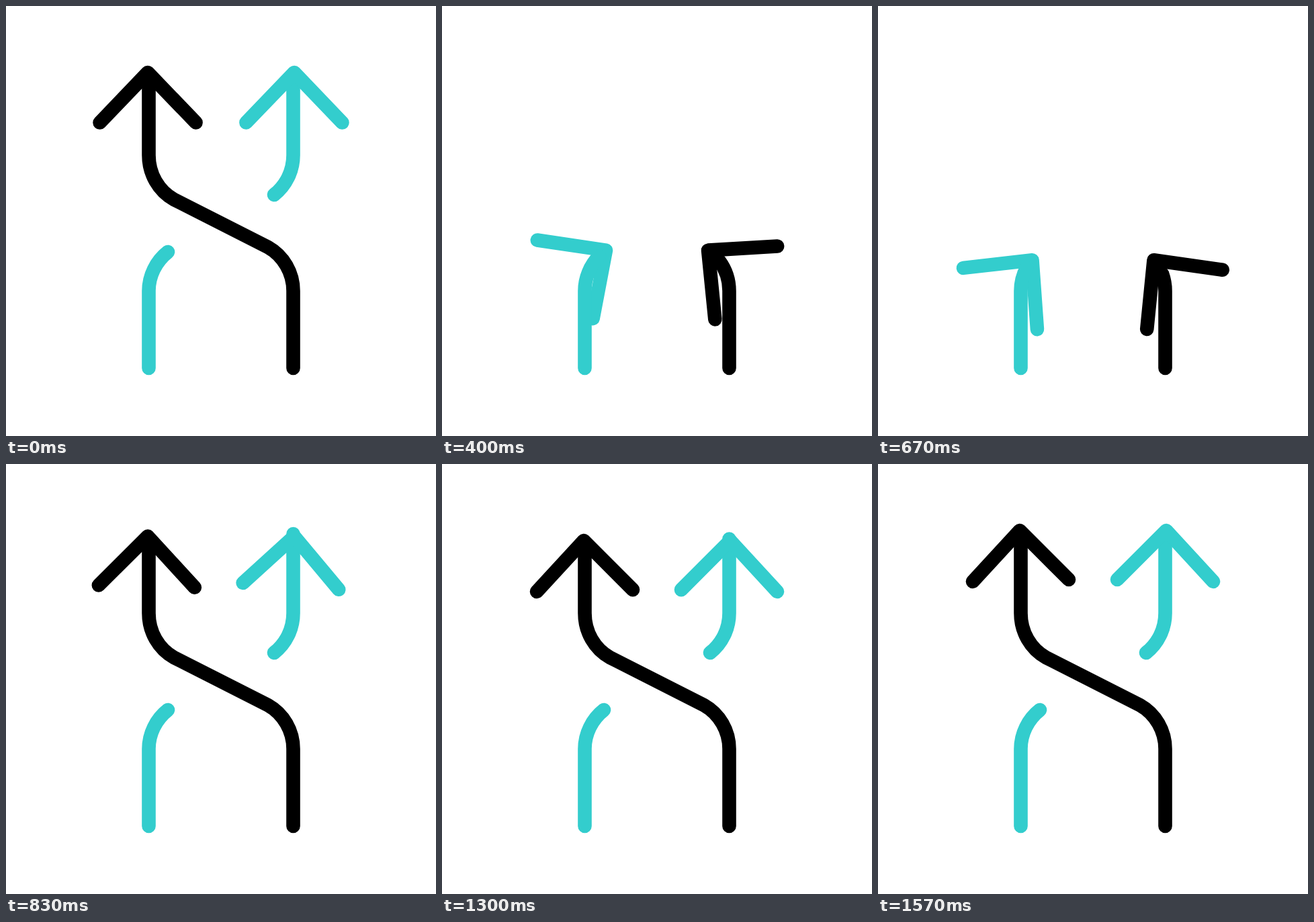
Animation of 640x640 px, one loop 2000 ms. Source, as an HTML page:

```html
<!DOCTYPE html>
<html lang="en">
<head>
<meta charset="utf-8">
<title>Crossing arrows</title>
<style>
  html, body { margin: 0; height: 100%; overflow: hidden; background: #fff; }
  svg { display: block; width: 100vw; height: 100vh; }
  path { fill: none; stroke: #000; stroke-width: 20.6; stroke-linecap: round; stroke-linejoin: round; }
  .teal { stroke: #33cdcd; }
</style>
</head>
<body>
<svg viewBox="0 0 640 640">
  <path id="upper" class="teal" d="M427.5 104V222C427.5 245 417 267 399 281"/>
  <path id="tealHead" class="teal" d="M-71.5 74.5L0 0L71.5 74.5"/>
  <path id="stem" d="M212.5 104V222C212.5 250 227 275 250 288L390 359C413 372 427.5 397 427.5 424V539"/>
  <path id="blackHead" d="M-71.5 74.5L0 0L71.5 74.5"/>
  <path id="lower" class="teal" d="M241 366C223 380 212.5 402 212.5 424V539"/>
</svg>
<script>
const LOOP = 2000;
const el = id => document.getElementById(id);

// Route of the arrow tips; the teal tip runs on its mirror image.
const route = document.createElementNS('http://www.w3.org/2000/svg', 'path');
route.setAttribute('d', 'M211 97C211 140 212 180 212 222C212 250 229 273 250 288L390 359C411 374 427.5 397 427.5 424V482');
const routeLength = route.getTotalLength();
const REST = 2;

// [time in ms, value]
const travel = [[0, REST], [600, routeLength], [830, 10.6], [1070, 166], [1357, 0], [1570, REST]];
const blackLean = [[0, 0], [230, 4], [530, -4.6], [600, 0], [830, -1.5], [1070, 13], [1300, 0.8], [1570, 1.1]];
const tealLean = [[0, 0], [230, 4], [530, 4.3], [600, 0], [830, 3.7], [1070, 13], [1300, 0.8], [1570, 1.1]];

const linear = x => x;
const smooth = x => x * x * (3 - 2 * x);

function valueAt(keys, time, ease) {
  const next = keys.findIndex(key => key[0] > time);
  if (next < 0) return keys[keys.length - 1][1];
  const [t0, v0] = keys[next - 1], [t1, v1] = keys[next];
  return v0 + (v1 - v0) * ease((time - t0) / (t1 - t0));
}

function trimStart(path, amount) {
  const length = path.getTotalLength();
  const cut = Math.max(0, amount);
  path.style.visibility = cut < length ? 'visible' : 'hidden';
  path.style.strokeDasharray = `${length + 1} 2000`;
  path.style.strokeDashoffset = -cut;
}

function placeHead(head, distance, lean, mirror) {
  const at = d => route.getPointAtLength(Math.min(routeLength, Math.max(0, d)));
  const tip = at(distance), before = at(distance - 1), after = at(distance + 1);
  const heading = Math.atan2(after.x - before.x, after.y - before.y) * 180 / Math.PI;
  head.setAttribute('transform',
    `${mirror ? 'translate(640 0) scale(-1 1) ' : ''}translate(${tip.x} ${tip.y}) rotate(${-heading - lean})`);
}

// Thirty pictures per second, on a 10 ms clock.
function stepTime(ms) {
  const rest = ms % 100;
  return ms - rest + (rest >= 70 ? 70 : rest >= 30 ? 30 : 0);
}

function draw(now) {
  const time = stepTime(now % LOOP);
  const distance = valueAt(travel, time, smooth);
  const progress = (distance - REST) / (routeLength - REST);
  placeHead(el('blackHead'), distance, valueAt(blackLean, time, linear), false);
  placeHead(el('tealHead'), distance, valueAt(tealLean, time, linear), true);
  trimStart(el('stem'), 520 * progress);
  trimStart(el('upper'), 575 * progress - 10);
  trimStart(el('lower'), 520 * progress - 376);
}

const start = performance.now();
function tick() {
  draw(performance.now() - start);
  requestAnimationFrame(tick);
}
tick();
</script>
</body>
</html>
```
